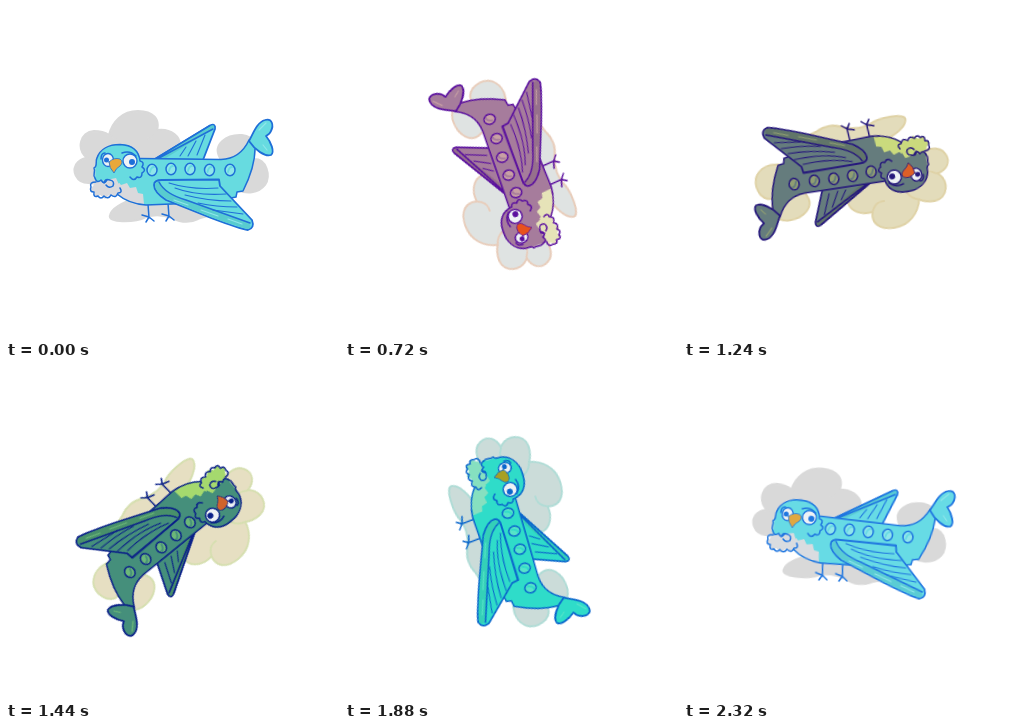
An HTML page that plays this animation: 333 px wide and 333 px high, repeating every 2360 ms.

```html
<!DOCTYPE html>
<html lang="en">
<head>
<meta charset="utf-8">
<title>Spinning bird plane</title>
<style>
@property --body { syntax: "<color>"; inherits: true; initial-value: #67dbe0 }
@property --line { syntax: "<color>"; inherits: true; initial-value: #1f6fd8 }
@property --belly { syntax: "<color>"; inherits: true; initial-value: #d9d9dc }
@property --beak { syntax: "<color>"; inherits: true; initial-value: #e8a83a }
@property --cloud { syntax: "<color>"; inherits: true; initial-value: #d9d9d9 }
@property --rim { syntax: "<color>"; inherits: true; initial-value: #d9d9d9 }
@property --band { syntax: "<color>"; inherits: true; initial-value: #58cccf }
@property --glint { syntax: "<color>"; inherits: true; initial-value: #8fe6ea }

html, body { margin: 0; width: 100%; height: 100%; overflow: hidden; background: #fff }
svg { display: block; width: 100%; height: 100%; animation: tint 2360ms linear infinite }
#spin { transform-origin: 166.5px 166.5px; animation: spin 2360ms steps(59) infinite }

@keyframes spin { to { transform: rotate(-360deg) } }
@keyframes tint {
  0%, 100% { --body: #67dbe0; --line: #1f6fd8; --belly: #d9d9dc; --beak: #e8a83a; --cloud: #d9d9d9; --rim: #d9d9d9; --band: #58cccf; --glint: #8fe6ea }
  16.95% { --body: #aec4dd; --line: #6a2be0; --belly: #cfcfe0; --beak: #dc5a14; --cloud: #d9d9d9; --rim: #d9d9d9; --band: #a8a9b8; --glint: #c6c8d2 }
  30.5% { --body: #a67c9c; --line: #5a0f9e; --belly: #e6e3b8; --beak: #e8521c; --cloud: #dfe3e2; --rim: #e8cdbb; --band: #96708c; --glint: #c8a0a4 }
  44.07% { --body: #85697f; --line: #43106f; --belly: #f0dc8c; --beak: #e85a20; --cloud: #e0d8b4; --rim: #e8c49c; --band: #7a5a68; --glint: #b5846c }
  61.02% { --body: #458f7b; --line: #0a2088; --belly: #a5d96e; --beak: #d0642c; --cloud: #e6dfc2; --rim: #d6dfb0; --band: #48906a; --glint: #6cb878 }
  79.66% { --body: #2fdcc9; --line: #0a66cc; --belly: #86e0c0; --beak: #a8a024; --cloud: #cbdcd9; --rim: #b0dcd6; --band: #34d0b8; --glint: #56e4c8 }
  98.3% { --body: #67dbe5; --line: #1f76e0; --belly: #d9dce0; --beak: #e0a840; --cloud: #d9d9d9; --rim: #d9d9d9; --band: #5accd4; --glint: #8fe6ea }
}

path, circle, ellipse { stroke-linejoin: round; stroke-linecap: round }
.cloud { fill: var(--cloud); stroke: var(--rim); stroke-width: 2 }
.puff { fill: none; stroke: var(--rim); stroke-width: 2 }
.body { fill: var(--body); stroke: var(--line); stroke-width: 1.8 }
.belly { fill: var(--belly) }
.band { fill: var(--band) }
.beak { fill: var(--beak); stroke: var(--line); stroke-width: .8 }
.ink { fill: none; stroke: var(--line); stroke-width: 1.5 }
.thin { fill: none; stroke: var(--line); stroke-width: 1.1 }
.shine { fill: none; stroke: var(--glint); stroke-width: 1.2 }
.window { fill: var(--glint); stroke: var(--line); stroke-width: 1.5 }
.eye { fill: #eef2f5; stroke: var(--line); stroke-width: 1.4 }
.pupil { fill: var(--line) }
</style>
</head>
<body>
<svg viewBox="0 0 333 333">
  <defs>
    <g id="window">
      <ellipse class="window" rx="5" ry="5.8"/>
      <path d="M-2 2Q-1-3 2-3" fill="none" stroke="var(--body)" stroke-width="1.8"/>
    </g>
    <path id="leg" class="ink" d="M0 0L1 14M-6 11L1 13L6 17M1 13L-2 18"/>
  </defs>
  <g id="spin">
    <path class="cloud" d="M84 177C70 178 64 163 72 156Q77 152 81 152C70 143 74 126 88 125Q97 125 103 129C106 116 116 105 132 105C148 105 154 114 151 124C165 122 176 131 173 141C171 151 162 156 150 157L140 188L100 182Q94 178 84 177Z"/>
    <path class="cloud" d="M104 209C106 202 118 196 130 192L200 190C214 193 220 200 213 206C205 211 197 210 192 213Q180 219 166 212Q152 207 140 211C128 217 101 217 104 209Z"/>
    <path class="cloud" d="M214 152C206 138 221 128 236 129C250 130 251 144 247 153C261 152 265 170 259 179C252 188 240 188 232 184L214 180Z"/>
    <path class="puff" d="M82 152Q90 158 98 153M103 129Q111 131 114 138M151 124Q147 134 138 133M247 153Q241 154 238 160"/>

    <path class="body" d="M149 153L204 119.500Q210 117 209 123L197 154Z"/>
    <path class="band" d="M151 152L204 120Q209 118 208 122L160 152Z"/>
    <path class="ink" d="M149 153L204 119.500M153 152L207 123" />
    <path class="thin" d="M199 129L191 149M190 135L182 150M180 141L174 150"/>

    <use href="#leg" x="142" y="198"/>
    <use href="#leg" x="162" y="197"/>

    <path fill="var(--body)" d="M130 152L215 153.500C228 153 237 147 243 134L249 143C249 160 241 177 237 185L231 186L230 191L225 192L222 197L140 199C125 198 116 194 110 187L100 165Z"/>
    <path class="belly" d="M92 174L110 173L115 179L121 177L124 182L130 181L132 187L137 188L138 198Q122 198 111 188L95 190Z"/>
    <path class="ink" d="M134 152.500L215 153.500C228 153 237 147 243 134M249 143C249 160 241 177 237 185L231 186L230 191L225 192L222 197M190 197L140 199Q123 198 111 188"/>
    <path class="body" d="M243 135C247 128 251 116 259 114C266 112 268 119 265 125Q264 128 260 130C265 136 269 146 265 149C259 151 249 144 243 135Z"/>
    <path class="shine" d="M253 124L260 117M257 139L261 144"/>

    <use href="#window" x="146" y="164"/>
    <use href="#window" x="165" y="163"/>
    <use href="#window" x="184" y="163"/>
    <use href="#window" x="203.500" y="164"/>
    <use href="#window" x="224" y="164"/>

    <path class="body" d="M156 174L213 173.500L214 180L246 214Q249 222 242 224Q234 223 205 212L160 194Q148 186 148 179Q148 174 156 174Z"/>
    <path class="band" d="M154 176Q160 188 180 194L243 217Q246 221 242 223Q230 220 205 211L161 193Q149 186 149 179Q150 175 154 176Z"/>
    <path class="ink" d="M153 176Q159 188 180 194L244 217"/>
    <path class="thin" d="M163 177Q185 184 212 182M169 182Q190 190 220 188M179 189Q202 195 225 195M192 197Q210 201 231 201M207 204L237 208"/>
    <path class="shine" d="M168 194L182 199M195 204L212 210M222 213L236 218"/>

    <path fill="var(--body)" d="M88 173C91 169 88 164 90 158C91 146 101 138 114 138C127 138 135 146 134 156L138 163L134 171L127 174L119 171L112 178L92 176Z"/>
    <path class="belly" d="M90 176L110 172L115 183L109 190L103 189L99 193L95 189L89 191L88 186L84 184Z"/>
    <path class="ink" d="M89 172C86 169 90 166 88 162C92 160 89 155 91 152C94 143 103 138.500 114 138.500C127 139 133 146 134 155Q139 156 136 161Q141 164 136 167Q136 173 131 171Q128 176 124 171M89 172Q91 178 95 174Q98 179 101 174"/>
    <path class="ink" d="M90 176Q83 176 85 181Q83 186 88 186Q87 192 92 190Q95 194 98 190Q102 194 105 189Q110 193 112 187Q117 187 114 182"/>
    <path class="ink" d="M98 177Q99 172 104 174Q109 175 107 180Q103 183 100 179M99 147Q95 147 95 153M116 147Q124 144 130 150"/>
    <ellipse class="eye" cx="102" cy="154" rx="5.500" ry="6.500"/>
    <circle class="eye" cx="124" cy="155" r="7"/>
    <circle class="pupil" cx="100.500" cy="154" r="2.500"/>
    <circle class="pupil" cx="126" cy="156" r="3"/>
    <path class="beak" d="M103 156Q108 151 114 153Q118 156 114 160Q110 162 108 167Q103 162 103 156Z"/>
  </g>
</svg>
</body>
</html>
```
